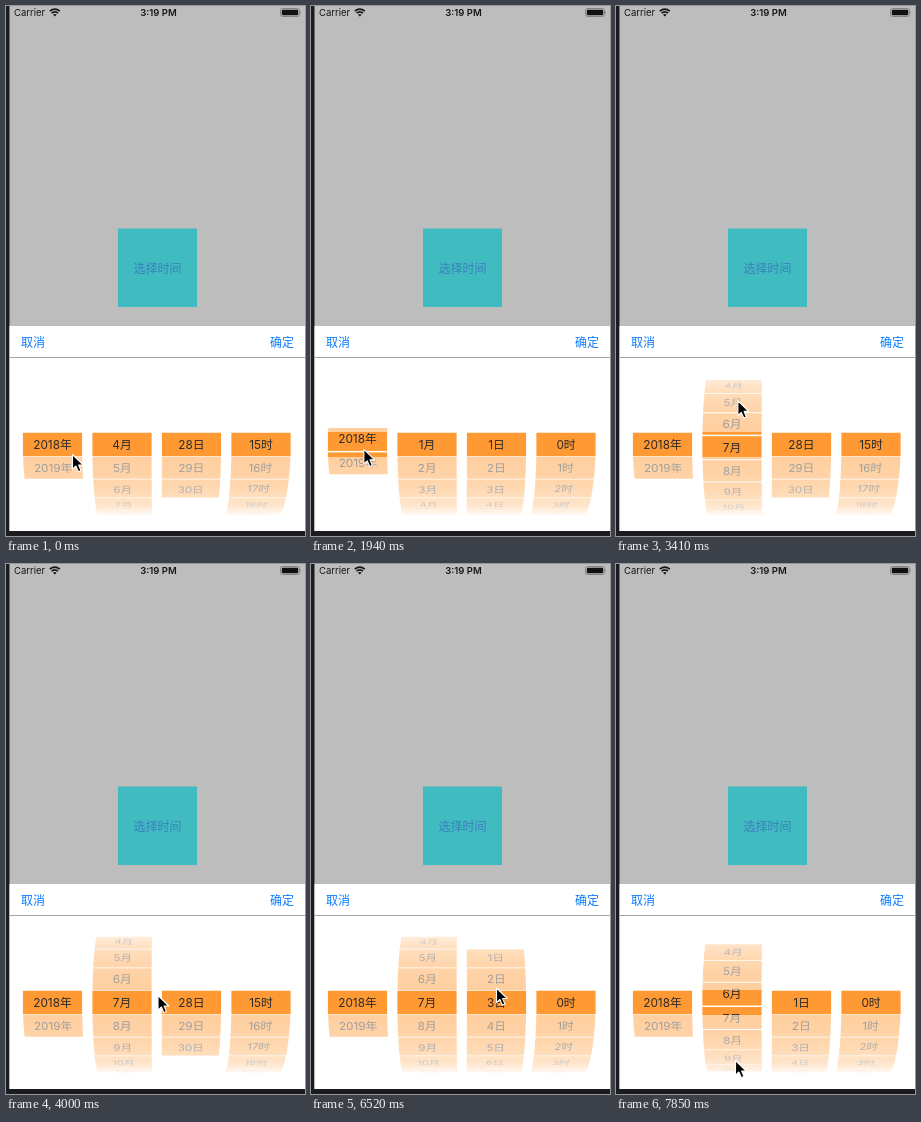
An HTML page that plays this animation: 299 by 530 pixels, repeating every 8000 ms.

```html
<!DOCTYPE html>
<html lang="zh-CN">
<head>
<meta charset="utf-8">
<title>日期选择器</title>
<style>
  html, body { margin: 0; width: 100%; height: 100%; overflow: hidden; background: #fff; }
  svg { display: block; width: 100vw; height: 100vh; }
  text { font-family: Inter, "Noto Sans CJK SC", "Noto Sans CJK", sans-serif; font-size: 11.8px; }
  .mid text { text-anchor: middle; fill: #2b2b2b; }
  .bar text { font-size: 12px; fill: #0a7aff; }
  .status text { font-size: 9.5px; fill: #161616; }
</style>
</head>
<body>
<svg viewBox="0 0 299 530">
  <defs>
    <linearGradient id="fade" gradientUnits="userSpaceOnUse" x1="0" y1="367.5" x2="0" y2="509.5"></linearGradient>
    <mask id="veil" maskUnits="userSpaceOnUse" x="0" y="352" width="299" height="173">
      <rect y="352" width="299" height="173" fill="url(#fade)"/>
      <rect y="426" width="299" height="25" fill="#000"/>
    </mask>
    <clipPath id="band"><rect y="426" width="299" height="25"/></clipPath>
  </defs>

  <rect width="299" height="530" fill="#1c1b20"/>
  <rect x="3.5" width="295.5" height="525" fill="#bdbdbd"/>

  <g class="status">
    <text x="8" y="10">Carrier</text>
    <text x="152.5" y="10" text-anchor="middle" font-weight="600">3:19 PM</text>
    <path d="M43.8 5.2Q48.8 .9 53.8 5.2M45.6 7.2Q48.8 4.4 52 7.2" fill="none" stroke="#161616" stroke-width="1.7"/>
    <path d="M47 8.7Q48.8 7.3 50.6 8.7L48.8 10.6Z" fill="#161616"/>
    <rect x="274.5" y="2.5" width="19" height="8" rx="2" fill="none" stroke="#777" stroke-width=".8"/>
    <rect x="275.8" y="3.8" width="16.4" height="5.4" rx="1" fill="#111"/>
    <path d="M294.4 5q1.4 1.5 0 3z" fill="#777"/>
  </g>

  <rect x="112" y="222.5" width="79" height="78.5" fill="#40bcc0"/>
  <text x="151.5" y="266.5" text-anchor="middle" style="font-size:12px" fill="#3b80bd">选择时间</text>

  <rect x="3.5" y="320" width="295.5" height="205" fill="#fff"/>
  <rect x="3.5" y="351" width="295.5" height="1" fill="#a3a3a3"/>
  <g class="bar">
    <text x="15" y="341">取消</text>
    <text x="264" y="341">确定</text>
  </g>

  <g class="mid" id="wheel" mask="url(#veil)"></g>
  <g class="mid" id="center" clip-path="url(#band)"></g>
  <path id="cursor" d="M0 0V14.6L3.4 11.5L5.9 17.2L8.5 16.1L6.1 10.5H10.8Z" fill="#000" stroke="#fff" stroke-width="1.1" stroke-linejoin="round"/>
</svg>

<script>
const LOOP = 8000, TICK = 148;
const MID = 438.5, AXIS = 151, R = 71, STEP = 0.34, DEPTH = 9.46;
const PITCH = 25, HALF = 29.6, ORANGE = '#ff9933';
const $ = id => document.getElementById(id);
const f = n => n.toFixed(3);

// the wheel pales as it turns away
for (let u = -1; u <= 1.001; u += 1 / 16) {
  const alpha = .48 * Math.sqrt(Math.max(0, 1 - u * u));
  $('fade').innerHTML += `<stop offset="${(u + 1) / 2}" stop-color="#fff" stop-opacity="${alpha}"/>`;
}

// moves: [first tick, last tick, ...where to]
const pointer = [
  [0, 1, 64.5, 451],
  [3, 7, 51.5, 415.5],
  [11, 14, 53, 446], [14, 17, 119.5, 455.5],
  [20, 24, 122, 392],
  [25, 27, 152, 431.5], [27, 32, 180, 435],
  [33, 35, 179.5, 406.5], [35, 37, 175, 395],
  [43, 44, 185.5, 424],
  [45, 49, 184, 472], [49, 51, 104, 481],
  [52, 53, 119.5, 496.5]];
const yearRows = [[3, 7, 1], [11, 15, 0]];
const monthRows = [[20, 24, 3], [52, 53, 2.35]];
const dayRows = [[33, 39, 2], [45, 50, 0]];

const clamp = (v, a, b) => Math.max(a, Math.min(b, v));
const easeOut = p => 1 - (1 - p) ** 2.23;

function glide(from, moves, n) {
  return moves.reduce((at, [a, b, ...to]) => {
    const p = easeOut(clamp((n - a) / (b - a), 0, 1));
    return at.map((v, i) => v + (to[i] - v) * p);
  }, from);
}

const scale = a => DEPTH / (DEPTH + 1 - Math.cos(a));
const bent = (x, a) => AXIS + (x - AXIS) * scale(a);
const height = a => MID + R * Math.sin(a);

function curvedRow(cx, k, label) {
  const edge = d => clamp((k + d) * STEP, -Math.PI / 2, Math.PI / 2);
  const from = edge(-.48), to = edge(.48);
  if (to - from < .01) return '';
  const left = [], right = [];
  for (let i = 0; i <= 4; i++) {
    const a = from + (to - from) * i / 4, y = f(height(a));
    left.push(f(bent(cx - HALF, a)) + ',' + y);
    right.unshift(f(bent(cx + HALF, a)) + ',' + y);
  }
  const row = `<polygon points="${left.concat(right).join(' ')}" fill="${ORANGE}"/>`;
  const a = k * STEP, c = Math.cos(a), s = scale(a);
  if (c < .05) return row;
  const shear = (AXIS - cx) * s * s * Math.sin(a) / DEPTH / R;
  const m = [s, 0, shear, c, bent(cx, a), height(a)].map(f);
  return row + `<text y="4.3" transform="matrix(${m})">${label}</text>`;
}

function flatRow(cx, k, label) {
  const y = MID + k * PITCH, h = PITCH * .94;
  return `<rect x="${cx - HALF}" y="${f(y - h / 2)}" width="${HALF * 2}" height="${h}" fill="${ORANGE}"/>` +
    `<text x="${cx}" y="${f(y + 4.3)}">${label}</text>`;
}

function draw(n) {
  // the first year starts in the middle of April; later choices open full lists
  const nextYear = n >= 7 && n < 15, full = nextYear || n >= 28;
  const lastDay = nextYear || full ? 31 : 30;
  const columns = [
    ['年', 2018, 2019, glide([0], yearRows, n)],
    ['月', nextYear ? 1 : 4, 12, glide([0], monthRows, n)],
    ['日', full ? 1 : 28, lastDay, glide([0], dayRows, n)],
    ['时', full ? 0 : 15, 23, [0]]];
  let wheel = '', center = '';
  columns.forEach(([unit, min, max, [pos]], i) => {
    const cx = 46.5 + 69.5 * i;
    for (let v = min; v <= max; v++) {
      const k = v - min - pos;
      if (Math.abs(k) < 5.1) wheel += curvedRow(cx, k, v + unit);
      if (Math.abs(k) < 1.5) center += flatRow(cx, k, v + unit);
    }
  });
  $('wheel').innerHTML = wheel;
  $('center').innerHTML = center;
  $('cursor').setAttribute('transform', `translate(${glide([66.5, 448.5], pointer, n).map(f)})`);
}

let shown = -1;
const start = performance.now();
function loop() {
  const n = Math.floor((performance.now() - start) % LOOP / TICK);
  if (n !== shown) draw(shown = n);
  requestAnimationFrame(loop);
}
loop();
</script>
</body>
</html>
```
